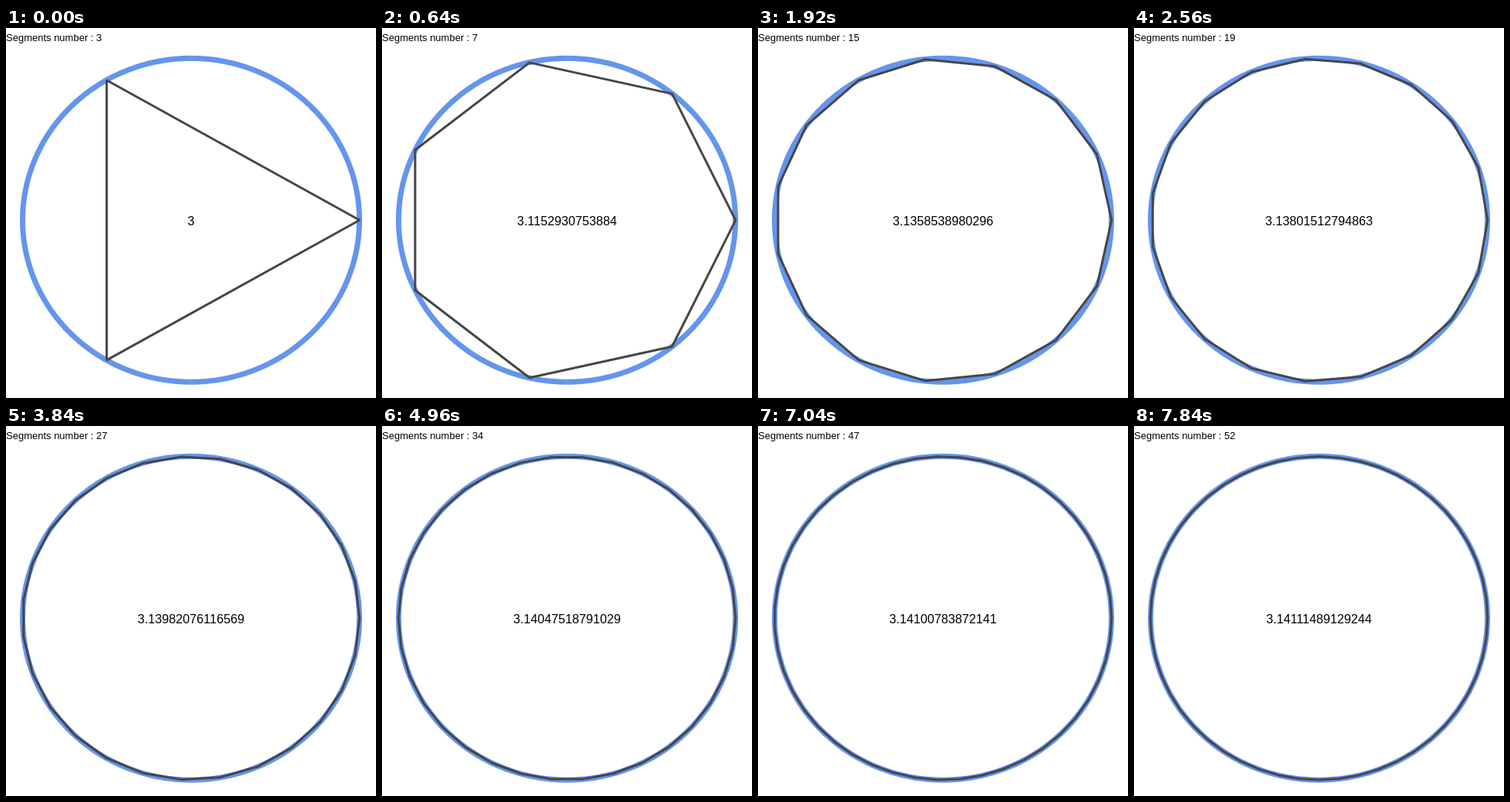
These frames come from a looping animation (480x480 px, 8000 ms). An HTML page:

```html
<!DOCTYPE html>
<html lang="en">
<head>
<meta charset="utf-8">
<style>
  html, body { margin: 0; height: 100%; overflow: hidden; background: #fff; }
  svg { display: block; width: 100vw; height: 100vh; }
  text { font-family: "Liberation Sans", Arial, sans-serif; }
</style>
</head>
<body>
<svg viewBox="0 0 480 480">
  <ellipse cx="240" cy="249.3" rx="218.5" ry="210" fill="none" stroke="#6495ed" stroke-width="7"/>
  <polygon id="polygon" fill="none" stroke="#464646" stroke-width="3" stroke-linejoin="bevel"/>
  <text id="label" x="0" y="17" font-size="13"></text>
  <text id="estimate" x="240" y="256" font-size="16.2" text-anchor="middle"></text>
</svg>
<script>
  const STEP = 160, FIRST = 3, COUNT = 50;
  const center = { x: 240, y: 249.3 }, radius = { x: 218.7, y: 209.7 };
  const [polygon, label, estimate] =
    ["polygon", "label", "estimate"].map(id => document.getElementById(id));
  let shown = 0;

  function show(segments) {
    const points = Array.from({ length: segments }, (_, i) => {
      const angle = 2 * Math.PI * i / segments;
      return [center.x + radius.x * Math.cos(angle), center.y + radius.y * Math.sin(angle)];
    });
    polygon.setAttribute("points", points.join(" "));
    label.textContent = `Segments number : ${segments}`;
    // Half the perimeter of a regular polygon with twice as many sides
    const pi = 2 * segments * Math.sin(Math.PI / (2 * segments));
    estimate.textContent = Number(pi.toPrecision(15));
  }

  const start = performance.now();
  function tick() {
    const elapsed = performance.now() - start;
    const segments = FIRST + Math.floor(elapsed / STEP) % COUNT;
    if (segments !== shown) show(shown = segments);
    requestAnimationFrame(tick);
  }
  tick();
</script>
</body>
</html>
```
